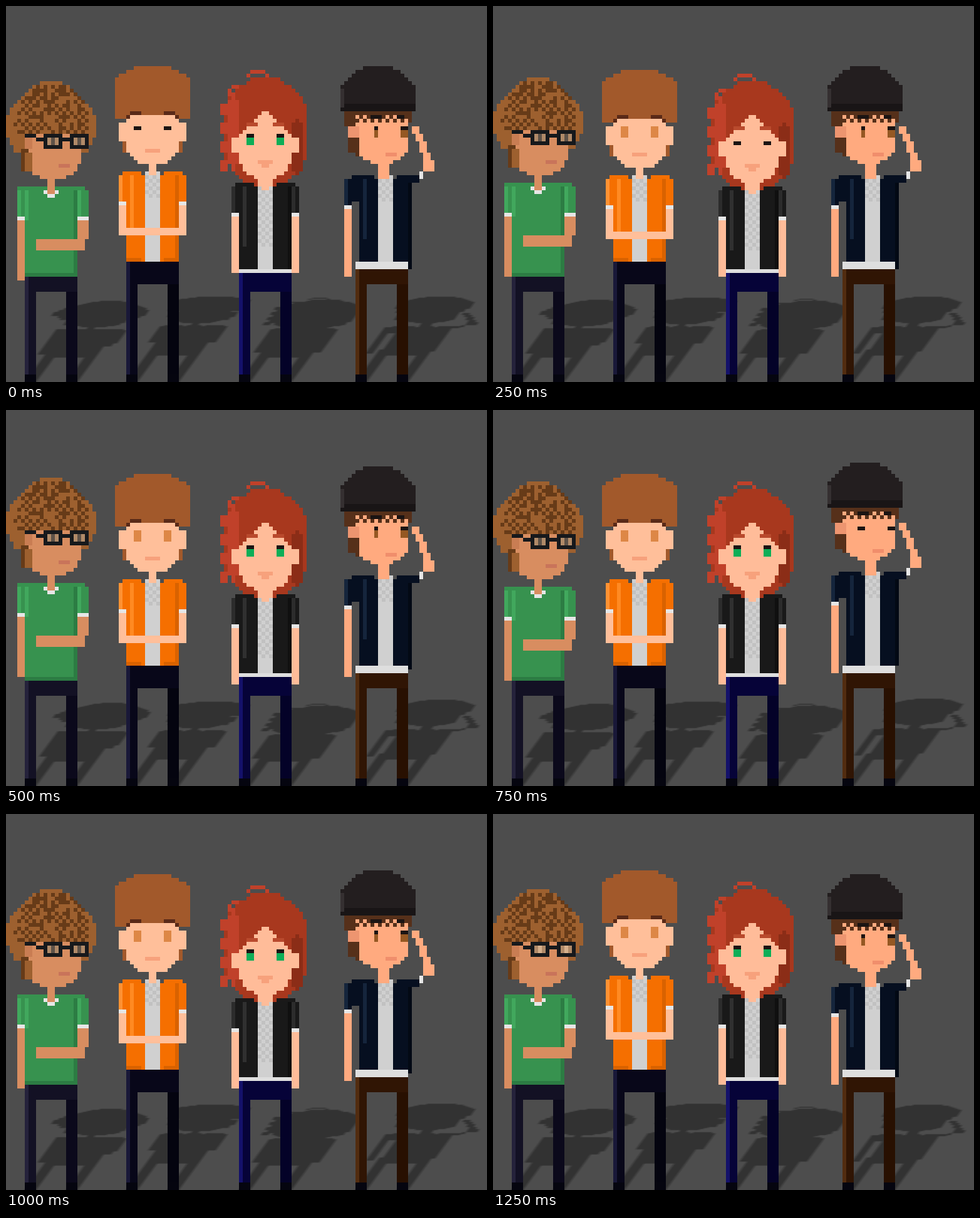
Recreate the animation shown at these times as an HTML page with a canvas. Size 640 by 500 pixels, loop 1500 ms.

```html
<!DOCTYPE html>
<html lang="en">
<head>
<meta charset="utf-8">
<title>Four pixel friends</title>
<style>
  html, body { margin: 0; width: 100%; height: 100%; overflow: hidden; background: #4d4d4d; }
  canvas { display: block; }
</style>
</head>
<body>
<canvas id="stage" width="640" height="500"></canvas>
<script>
const CELL = 5, PAD = 4, COLS = 128 + 2 * PAD, ROWS = 100;
const STEP = 250, STEPS = 6;
const WHITE = '#e6e6e6', LASH = '#1b1413';

const sprite = () => {
  const c = document.createElement('canvas');
  c.width = COLS;
  c.height = ROWS;
  return c.getContext('2d');
};
const stage = document.getElementById('stage').getContext('2d');
const g = sprite(), shade = sprite();

// Drawing helpers; one unit is one cell
const box = (color, x, y, w = 1, h = 1) => {
  g.fillStyle = color;
  g.fillRect(x, y, w, h);
};

// The same box on both sides of the axis cx, starting d cells away from it
const pair = (color, cx, d, y, w = 1, h = 1) => {
  box(color, cx + d, y, w, h);
  box(color, cx - d - w, y, w, h);
};

// Box with rounded corners: [width, height] of the top and bottom ones.
// power 1 cuts them straight, 2 makes them elliptic.
const blob = (color, x, y, w, h, top, bottom = [0, 0], power = 1.4) => {
  const inset = ([rx, ry], row) => {
    const t = Math.max(0, (ry - row - 0.5) / (ry || 1));
    return rx * (1 - (1 - t ** power) ** (1 / power));
  };
  for (let j = 0; j < h; j++) {
    const d = Math.round(Math.max(inset(top, j), inset(bottom, h - 1 - j)));
    box(color, x + d, y + j, w - 2 * d);
  }
};

const checker = (color, x, y, w, h) => {
  for (let j = 0; j < h; j++)
    for (let i = j % 2; i < w; i += 2) box(color, x + i, y + j);
};

const noise = (x, y) => {
  const v = Math.sin(x * 12.9898 + y * 78.233) * 43758.5453;
  return v - Math.floor(v);
};

// Body parts shared by the figures
const eyes = (cx, y, color, shut) => {
  pair(LASH, cx, 3, shut ? y + 1 : y, 2);
  if (!shut) pair(color, cx, 3, y + 1, 2, 2);
};

const sleeve = (x, y, color, light, skin, armLength) => {
  box(color, x, y, 2, 7);
  box(light, x, y, 1, 7);
  box(WHITE, x, y + 7, 2);
  box(skin, x, y + 8, 2, armLength);
};

const jacket = (cx, y, color, light, dark, checks) => {
  box('#d0d0d0', cx - 2, y, 4, 25);
  checker('#c1c1c1', cx - 2, y + 1, 4, checks);
  pair(color, cx, 2, y + 1, 5, 24);
  pair(color, cx, 3, y, 5);
  box(light, cx - 6, y + 1, 1, 16);
  box(dark, cx + 6, y + 1, 1, 24);
};

const legs = (cx, y, split, color, light, dark) => {
  box(color, cx - 7, y, 14, split - y);
  pair(color, cx, 4, split, 3, 100 - split);
  box(dark, cx + 4, split, 3, 100 - split);
  box(light, cx - 7, y, 1, 100 - y);
  pair('#05050f', cx, 4, 98, 3, 2);
};

const lens = (x, y, shut) => {
  blob('#17191c', x, y, 5, 4, [0, 0], [1, 1]);
  box('#b08a68', x + 1, y + 1, 3, 2);
  box(shut ? '#d6b08c' : '#5e5248', x + 2, y + 1, 1, 2);
};

// Each figure: step of its lowest pose, rows it rests above that, blinking step,
// the part that bobs and the part that stands still
const curly = {
  low: 5, rest: 2, blink: 5,
  top(shut) {
    const hair = '#9d602f', curl = '#673b18', skin = '#d88d60';
    const light = '#41a85d', dark = '#2c7c43';
    blob(hair, 0, 20, 24, 19, [11, 10], [3, 6]);
    box(hair, -1, 31, 1, 4);
    for (let y = 21; y < 34; y++) {
      const half = 10 * Math.sqrt(1 - ((y - 31) / 11) ** 2);
      for (let x = Math.ceil(12 - half); x < 12 + half; x++)
        if (noise(x, y) < ((x + y) % 2 ? 0.74 : 0.2)) box(curl, x, y);
    }
    blob(skin, 5, 34, 15, 12, [2, 1], [5, 5]);
    box(curl, 4, 38, 2, 6);
    box(hair, 5, 39, 2, 5);
    box('#c97d53', 5, 35, 2, 3);
    box('#c9745a', 14, 42, 3);

    lens(10, 34, shut);
    lens(17, 34, shut);
    box('#17191c', 5, 34, 3);
    box('#17191c', 8, 35, 2);
    box('#17191c', 15, 35, 2);

    box('#37924f', 3, 48, 18);
    box('#37924f', 5, 49, 14, 25);
    sleeve(3, 49, '#37924f', light, skin, 16);
    sleeve(19, 49, '#37924f', light, skin, 5);
    box('#37924f', 21, 49, 1, 7);
    box(WHITE, 21, 56);
    box(light, 5, 49, 1, 8);
    box(dark, 18, 49, 1, 25);
    box(WHITE, 10, 49, 4);
    box(WHITE, 11, 50, 2);
    box(skin, 11, 45, 2, 5);
    box(skin, 21, 57, 1, 5);
    box(skin, 8, 62, 13, 3);
  },
  base() {
    box('#2c7c43', 5, 71, 14);
    legs(12, 72, 76, '#131124', '#25223b', '#0b091b');
  }
};

const orange = {
  low: 2, rest: 1, blink: 0,
  top(shut) {
    const hair = '#a2592b', skin = '#ffbf9a', coat = '#f56f00';
    blob(skin, 32, 28, 14, 14, [0, 0], [4, 4]);
    blob(hair, 29, 16, 20, 13, [7, 4]);
    pair(hair, 39, 7, 29, 3);
    pair(skin, 39, 7, 31, 2, 5);
    pair(hair, 39, 7, 36, 1, 3);
    pair('#5a2a18', 39, 3, 28, 3);
    pair('#5a2a18', 39, 6, 29);
    if (shut) eyes(39, 31, '', true);
    else pair('#dd8746', 39, 3, 31, 2, 3);
    box('#f7a17c', 37, 38, 4);

    jacket(39, 44, coat, '#ff8a22', '#d96200', 6);
    sleeve(30, 45, coat, '#ff9233', skin, 6);
    sleeve(46, 45, coat, coat, skin, 6);
    box(skin, 38, 42, 2, 3);
    box(skin, 30, 59, 18, 2);
  },
  base() {
    pair('#d96200', 39, 3, 67, 4);
    legs(39, 68, 74, '#080719', '#191838', '#04040f');
  }
};

const ginger = {
  low: 3, rest: 0, blink: 1,
  top(shut) {
    const hair = '#a8381e', light = '#c0412a', deep = '#8b2d17', skin = '#ffbc99';
    const coat = '#191919';
    box(light, 65, 17, 4);
    pair(light, 67, 2, 18);
    box(light, 60, 21, 2);
    box(light, 59, 22, 1, 2);
    blob(hair, 58, 19, 22, 29, [9, 8], [8, 9]);
    for (let y = 26; y < 42; y += 5) box(light, 57, y, 2, 3);
    blob(light, 59, 23, 3, 21, [2, 4], [2, 4]);
    blob(deep, 76, 30, 3, 15, [1, 3], [1, 3]);
    blob(skin, 61, 27, 16, 10, [8, 8], [0, 0], 1);
    blob(skin, 62, 37, 14, 9, [0, 0], [5, 5]);
    pair(skin, 69, 7, 35, 2, 4);
    pair('#b94a2d', 69, 2, 31, 3);
    eyes(69, 34, '#0cae57', shut);
    box('#f7a17c', 67, 41, 4);
    box('#f7a17c', 68, 42, 2);

    jacket(69, 47, coat, '#303030', '#0f0f0f', 16);
    sleeve(60, 48, coat, '#2c2c2c', skin, 15);
    sleeve(76, 48, coat, '#2c2c2c', skin, 15);
    box(skin, 67, 46, 4, 2);
    box(skin, 68, 48, 2);
  },
  base() {
    box('#dedede', 62, 70, 14);
    legs(69, 71, 76, '#060338', '#14116a', '#040228');
  }
};

const beanie = {
  low: 0, rest: 2, blink: 3,
  top(shut) {
    const cap = '#231e1f', hair = '#56301a', skin = '#ffaa7f', coat = '#060f20';
    blob(skin, 93, 28, 14, 14, [0, 0], [5, 4]);
    box(hair, 90, 28, 3, 4);
    box(hair, 91, 32, 3, 7);
    box(hair, 93, 38, 1, 2);
    box(hair, 107, 28, 1, 3);
    box(hair, 91, 28, 17);
    checker(hair, 92, 29, 16, 2);
    box('#ed9570', 91, 32, 3, 3);
    blob(cap, 89, 16, 20, 11, [8, 6]);
    box('#191516', 89, 26, 20, 2);
    box('#353031', 89, 22, 1, 5);
    box(LASH, 97, 29, 3);
    box(LASH, 104, 29, 2);
    eyes(102, 32, '#955823', shut);
    if (!shut) box(skin, 97, 32, 1, 3);
    box('#f08e6c', 101, 39, 3);

    jacket(101, 45, coat, '#15253c', '#030914', 6);
    sleeve(90, 46, coat, '#15253c', skin, 18);
    box(coat, 92, 45, 2, 7);
    box(coat, 107, 45, 3, 2);
    box(WHITE, 110, 44, 1, 2);
    box(skin, 99, 42, 3, 4);

    // Raised arm: a slanting line from the temple to the elbow
    for (let i = 0; i < 11; i++) box(skin, 108 + Math.round(i * 0.4), 32 + i, 2);
    blob(skin, 111, 41, 3, 3, [0, 0], [1, 1]);
  },
  base() {
    box('#dedede', 94, 68, 13, 2);
    box('#dedede', 93, 68, 1, 2);
    legs(100, 70, 74, '#301504', '#522c10', '#281001');
  }
};

const friends = [curly, orange, ginger, beanie];

// Sinks towards the low step, two rows deep, and comes back up
const bob = ({ low, rest }, step) => {
  const gap = Math.abs(step - low);
  return Math.min(2, 3 - Math.min(gap, STEPS - gap)) - rest;
};

const drawStep = step => {
  g.setTransform(1, 0, 0, 1, 0, 0);
  g.clearRect(0, 0, COLS, ROWS);
  for (const f of friends) {
    g.setTransform(1, 0, 0, 1, PAD, bob(f, step));
    f.top(step === f.blink);
    g.setTransform(1, 0, 0, 1, PAD, 0);
    f.base();
  }

  shade.globalCompositeOperation = 'copy';
  shade.drawImage(g.canvas, 0, 0);
  shade.globalCompositeOperation = 'source-in';
  shade.fillStyle = '#323232';
  shade.fillRect(0, 0, COLS, ROWS);

  stage.fillStyle = '#4d4d4d';
  stage.fillRect(0, 0, 640, 500);
  const area = [-PAD * CELL, 0, COLS * CELL, ROWS * CELL];
  // Shadow: the same figures flattened and leaning right from the floor
  const lean = 0.2, flat = 0.27;
  stage.imageSmoothingEnabled = true;
  stage.setTransform(1, 0, -lean, flat, 500 * lean, 500 * (1 - flat));
  stage.drawImage(shade.canvas, ...area);
  stage.imageSmoothingEnabled = false;
  stage.setTransform(1, 0, 0, 1, 0, 0);
  stage.drawImage(g.canvas, ...area);
};

let shown = -1;
const start = performance.now();
const tick = () => {
  const step = Math.floor((performance.now() - start) / STEP) % STEPS;
  if (step !== shown) drawStep(shown = step);
  requestAnimationFrame(tick);
};
tick();
</script>
</body>
</html>
```
